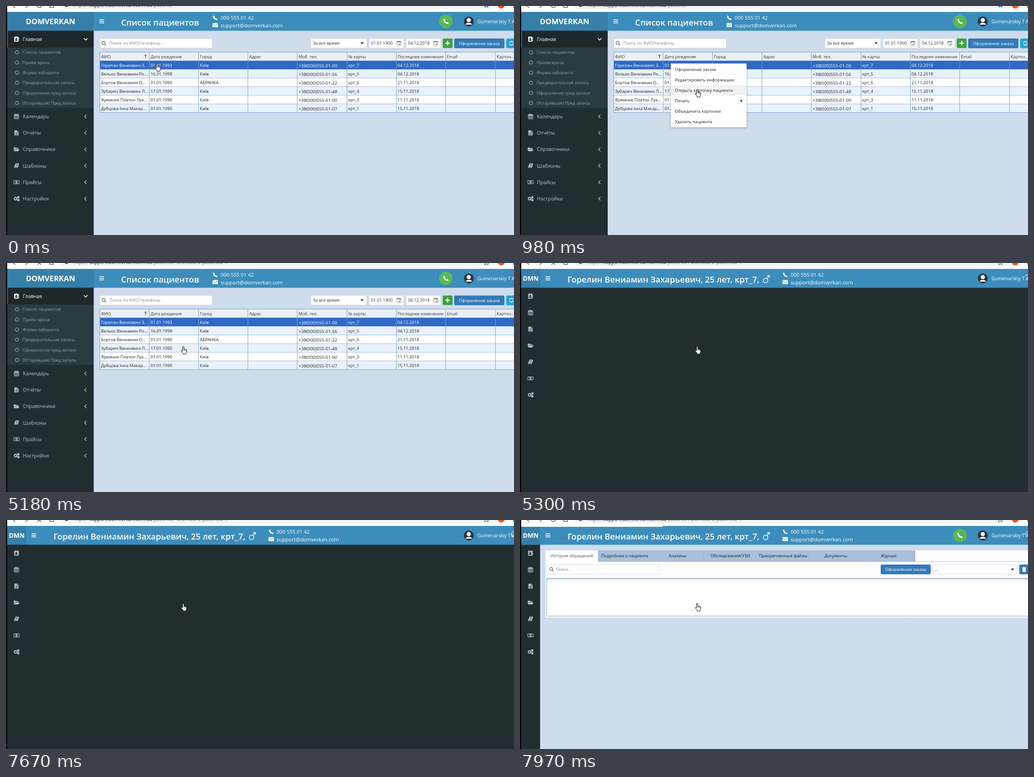
An HTML page with a canvas that plays this animation: 1112 by 504 pixels, repeating every 8 s.

```html
<!DOCTYPE html>
<html lang="ru">
<head>
<meta charset="utf-8">
<title>Список пациентов</title>
<style>
html, body { margin: 0; width: 100%; height: 100%; overflow: hidden; background: #cfdcec; }
canvas { display: block; width: 1112px; height: 504px; }
</style>
</head>
<body>
<canvas id="stage" width="1112" height="504"></canvas>
<script>
const c = document.getElementById('stage').getContext('2d');
const LOOP = 8000;
const FONT = '"Open Sans", "Noto Sans", sans-serif';
const BLUE = '#3c8dbc', DARK = '#222d32', PAGE = '#cfdcec', LINE = '#7f9dc8', BTN = '#337ab7';

const box = (x, y, w, h, fill) => { c.fillStyle = fill; c.fillRect(x, y, w, h); };

function round(x, y, w, h, r, fill, stroke) {
  c.beginPath();
  c.roundRect(x, y, w, h, r);
  if (fill) { c.fillStyle = fill; c.fill(); }
  if (stroke) { c.strokeStyle = stroke; c.lineWidth = 1; c.stroke(); }
}

function disc(x, y, r, fill) {
  c.beginPath();
  c.arc(x, y, r, 0, 7);
  c.fillStyle = fill;
  c.fill();
}

function ring(x, y, r, color, w = 1) {
  c.beginPath();
  c.arc(x, y, r, 0, 7);
  c.strokeStyle = color;
  c.lineWidth = w;
  c.stroke();
}

function line(pts, color, w = 1) {
  c.beginPath();
  for (let i = 0; i < pts.length; i += 2) c.lineTo(pts[i], pts[i + 1]);
  c.strokeStyle = color;
  c.lineWidth = w;
  c.stroke();
}

function poly(pts, fill) {
  c.beginPath();
  for (let i = 0; i < pts.length; i += 2) c.lineTo(pts[i], pts[i + 1]);
  c.closePath();
  c.fillStyle = fill;
  c.fill();
}

// y is the middle of the capital letters
function text(s, x, y, color = '#222', size = 9.25, weight = 400, align = 'left') {
  c.font = `${weight} ${size}px ${FONT}`;
  c.textAlign = align;
  c.fillStyle = color;
  c.fillText(s, x, y + size * 0.37);
  return c.measureText(s).width;
}

function at(x, y, draw) {
  c.save();
  c.translate(x, y);
  draw();
  c.restore();
}

function phone(x, y, k = 1) {
  at(x, y, () => {
    c.scale(k, k);
    c.beginPath();
    c.moveTo(-3.5, -3.5);
    c.quadraticCurveTo(-2.8, 2.8, 3.5, 3.5);
    c.strokeStyle = '#fff';
    c.lineWidth = 2.4;
    c.stroke();
    poly([-5.2, -3.6, -3.2, -5.3, -1, -2.4, -3, -0.6], '#fff');
    poly([3.6, 5.2, 5.3, 3.2, 2.4, 1, 0.6, 3], '#fff');
  });
}

function mail(x, y) {
  round(x - 6, y - 4.5, 12, 9, 1, '#fff');
  line([x - 6, y - 3, x, y + 1.2, x + 6, y - 3], BLUE);
}

function lens(x, y) {
  ring(x - 1, y - 1, 3.2, '#777', 1.4);
  line([x + 1.4, y + 1.4, x + 4.5, y + 4.5], '#777', 1.8);
}

function burger(x) {
  for (const y of [30, 33.5, 37]) box(x - 5, y - 0.5, 10, 1.6, '#fff');
}

function gear(x, y, r, color) {
  ring(x, y, r, color, 1.8);
  for (let i = 0; i < 8; i++) {
    const a = i * Math.PI / 4, u = Math.cos(a), v = Math.sin(a);
    line([x + u * r, y + v * r, x + u * (r + 1.6), y + v * (r + 1.6)], color, 1.2);
  }
}

const icons = [
  col => {
    round(-5, -5.5, 9, 11, 1, col);
    for (const y of [-3, 0, 3]) box(4, y - 0.8, 1.5, 1.6, col);
    disc(-0.5, -1.5, 1.7, DARK);
    round(-3.2, 0.6, 5.4, 2.8, 1, DARK);
  },
  col => {
    round(-5, -4, 10, 9.5, 1, null, col);
    box(-5, -4, 10, 2.3, col);
    for (const x of [-2, 1.5]) { box(x - 1, -6, 1.6, 3, col); box(x - 0.3, -2, 0.8, 7, col); }
    for (const y of [0.2, 2.6]) box(-5, y, 10, 0.8, col);
  },
  col => {
    poly([-4.5, -5.5, 1, -5.5, 1, -2, 4.5, -2, 4.5, 5.5, -4.5, 5.5], col);
    poly([2, -5.5, 4.5, -3, 2, -3], col);
    for (const y of [-0.5, 1.5, 3.5]) box(-2.5, y, 5, 0.9, DARK);
  },
  col => {
    poly([-6, 3, -6, -4, -2, -4, -1, -3, 4, -3, 4, -1, -3, -1], col);
    poly([-3, -0.2, 6.5, -0.2, 4, 4.2, -5.8, 4.2], col);
  },
  col => {
    poly([-2, -5, 5.5, -5, 3, 4.5, -5.5, 4.5, -5, 2], col);
    line([-1, -2.7, 3, -2.7], DARK, 0.9);
    line([-1.6, -0.7, 2.4, -0.7], DARK, 0.9);
    line([-4, 2.8, 2.2, 2.8], DARK, 0.9);
  },
  col => {
    box(-6.3, -4, 12.6, 8, col);
    box(-5.2, -2.9, 10.4, 5.8, DARK);
    c.beginPath();
    c.ellipse(0, 0, 2.3, 2.9, 0, 0, 7);
    c.fillStyle = col;
    c.fill();
    box(-0.5, -1.6, 1, 3.2, DARK);
  },
  col => {
    gear(-2, 0, 2.6, col);
    gear(4, -3, 1.2, col);
    gear(4, 3.2, 1.2, col);
  }
];

const sections = ['Главная', 'Календарь', 'Отчёты', 'Справочники', 'Шаблоны', 'Прайсы', 'Настройки'];
const pages = ['Список пациентов', 'Приём врача', 'Форма лаборанта', 'Предварительная запись',
  'Оформление пред.записи', '(Устаревшая) Пред запись'];

function browser(busy, opened, status) {
  box(0, 0, 1112, 13, '#fff');
  round(118, -14, 956, 21, 10, '#f1f3f4');
  const grey = '#5f6368';
  line([21, -4, 16, 0, 20, 4], grey, 1.6);
  line([43, 4, 47, 0, 42, -4], grey, 1.6);
  if (busy) {
    line([69, 4, 73, 0, 77, 4], grey, 1.6);
  } else {
    c.beginPath();
    c.arc(73, -1, 4.5, 0.2, 3);
    c.strokeStyle = grey;
    c.lineWidth = 1.6;
    c.stroke();
  }
  line([96, -2, 96, 3.2, 104, 3.2, 104, -2], grey, 1.6);
  box(129, -3, 7, 5, grey);
  let x = 146;
  x += text('https://', x, -1.5, '#777', 10.6);
  x += text('support.domverkan.com.ua', x, -1.5, '#222', 10.6);
  text('/patients' + (opened ? '/PatientCard?patientId=7' : ''), x, -1.5, '#777', 10.6);
  const star = [1047, -2, 1048, 4, 1051.5, 1.8, 1055, 4, 1056, -2];
  if (opened) line(star, grey, 1.2); else poly(star, '#4285f4');
  disc(1084, -2, 7.5, '#f4511e');
  disc(1111, 2, 1.3, grey);
  if (status) round(3, 11, 310, 4, [0, 0, 2, 0], '#fff');
}

function header(narrow, call) {
  const edge = narrow ? 44 : 192, shift = narrow ? 122.5 : 0;
  box(0, 13, 1112, 41.5, BLUE);
  box(0, 13, edge, 41.5, '#367fa9');
  if (narrow) {
    text('DMN', 23.5, 34, '#fff', 13.9, 700, 'center');
    text('Горелин Вениамин Захарьевич, 25 лет, крт_7,', 104, 36, '#fff', 18.2, 600);
    ring(537.5, 38.5, 5, '#fff', 1.4);
    line([540.5, 34.5, 545.5, 27.5], '#fff', 1.4);
    line([540.5, 28, 545.8, 27.2, 546, 32.5], '#fff', 1.4);
  } else {
    text('DOMVERKAN', 97.5, 34, '#fff', 16.6, 700, 'center');
    text('Список пациентов', 252, 36, '#fff', 18.2, 600);
  }
  burger(narrow ? 61 : 209.5);
  phone(458 + shift, 26);
  text('000 555 01 42', 470 + shift, 26, '#fff', 11.1);
  mail(458 + shift, 42);
  text('support@domverkan.com', 470 + shift, 42.5, '#fff', 11.2);
  if (call) {
    disc(963, 34, 15, '#58b957');
    phone(963, 34, 1.15);
  }
  disc(1013, 34, 10.8, '#2b3440');
  disc(1013, 31, 4.6, '#fff');
  c.beginPath();
  c.ellipse(1013, 41, 7, 4, 0, Math.PI, 0);
  c.fillStyle = '#fff';
  c.fill();
  text('Gumenarskiy T A', 1032, 34, '#fff', 10.4);
}

function spinner(t) {
  const a = Math.floor(t / 135) * 0.9;
  c.beginPath();
  c.arc(1112, 31.5, 5.8, a, a + 4.6);
  c.strokeStyle = '#fff';
  c.lineWidth = 1.2;
  c.stroke();
}

function sidebar(narrow) {
  box(0, 54.5, narrow ? 44 : 192, 450, DARK);
  if (!narrow) {
    box(0, 54.5, 192, 37, '#1e282c');
    box(2, 54.5, 2, 37, BLUE);
    box(2, 91.5, 190, 132.5, '#2c3b41');
    pages.forEach((s, i) => {
      const y = 102 + i * 22.3;
      ring(24, y, 3.7, '#8aa4af', 1.4);
      text(s, 36.5, y, '#8aa4af', 9.2);
    });
  }
  sections.forEach((s, i) => {
    const y = narrow ? 73 + i * 36.2 : i ? 243 + (i - 1) * 36.2 : 73;
    const col = i || narrow ? '#b8c7ce' : '#fff';
    at(23, y, () => icons[i](col));
    if (narrow) return;
    text(s, 37, y, col, 10.8);
    if (i) line([176, y - 4, 172, y, 176, y + 4], col, 1.4);
    else line([170.5, y - 2, 174.5, y + 2, 178.5, y - 2], col, 1.6);
  });
}

function button(x, y, w, s) {
  round(x, y, w, 21.5, 3, BTN);
  text(s, x + w / 2, y + 11, '#fff', 9.15, 400, 'center');
}

function field(x, y, w, s, col = '#333', pad = 5) {
  round(x + 0.5, y + 0.5, w - 1, 21, 2, '#fff', '#d2d9e4');
  text(s, x + pad, y + 11, col);
}

const caret = (x, y) => poly([x - 3.5, y - 2, x + 3.5, y - 2, x, y + 2], '#222');

function dateField(x, s) {
  field(x, 71, 77, s);
  round(x + 61.5, 77.5, 9, 9, 1, null, '#888');
  box(x + 61, 78, 10, 2, '#888');
  box(x + 66, 83, 2.5, 2.5, '#888');
}

const cols = [205, 313.5, 421.5, 529.5, 637.5, 746, 854, 962, 1071];
const heads = ['ФИО', 'Дата рождения', 'Город', 'Адрес', 'Моб. тел.', '№ карты', 'Последнее изменение', 'Email', 'Карточ...'];
const rows = [
  ['Горелин Вениамин З...', '01.01.1993', 'Київ', '', '+38(000)555-01-00', 'крт_7', '04.12.2018'],
  ['Велько Вениамин Ро...', '16.01.1998', 'Київ', '', '+38(000)555-01-56', 'крт_5', '04.12.2018'],
  ['Бортов Вениамин О...', '01.01.1990', 'АБРАНКА', '', '+38(000)555-01-22', 'крт_6', '21.11.2018'],
  ['Зубарич Вениамин Л...', '17.01.1990', 'Київ', '', '+38(000)555-01-48', 'крт_4', '15.11.2018'],
  ['Яремник Платон Лук...', '01.01.1990', 'Київ', '', '+38(000)555-01-90', 'крт_3', '11.11.2018'],
  ['Дубцова Інна Макар...', '01.01.1990', 'Київ', '', '+38(000)555-01-07', 'крт_1', '15.11.2018']
];

function list() {
  field(205, 71, 247, 'Поиск по ФИО/телефону...', '#888', 21);
  lens(214.5, 82);
  field(667, 71, 123, 'За всё время');
  caret(779.5, 82);
  dateField(794, '01.01.1900');
  dateField(875, '04.12.2018');
  round(956, 71.5, 21.5, 21, 3, '#409f40');
  box(961.5, 80.8, 10.5, 2.2, '#fff');
  box(965.7, 76.7, 2.2, 10.5, '#fff');
  button(981, 71.5, 110, 'Оформление заказа');
  round(1095, 71.5, 24, 21.5, 3, '#22a7d6');
  for (const a of [0.3, 3.44]) {
    c.beginPath();
    c.arc(1106, 82, 4, a, a + 2.4);
    c.strokeStyle = '#fff';
    c.lineWidth = 1.7;
    c.stroke();
  }

  box(205, 101, 907, 20, '#e9f0f8');
  rows.forEach((row, r) => {
    const y = 121 + r * 19;
    box(205, y, 907, 19, r ? (r % 2 ? '#e7f2fc' : '#fff') : '#2f69c5');
    row.forEach((s, i) => text(s, cols[i] + 3, y + 10, r ? '#222' : '#fff', i === 4 ? 9.75 : 9.25));
    line([205, y + 18.5, 1112, y + 18.5], '#a5bbdb');
  });
  heads.forEach((s, i) => {
    text(s, cols[i] + 3, 111.5, '#333', 9.2);
    const x = Math.floor(cols[i]) + 0.5;
    line([x, 101, x, 235], LINE);
  });
  line([205, 101.5, 1112, 101.5], LINE);
  line([205, 120.5, 1112, 120.5], LINE);
  line([205, 234.5, 1112, 234.5], LINE);
  line([305.5, 115, 305.5, 107], '#222');
  line([303, 109.5, 305.5, 107, 308, 109.5], '#222');
}

const actions = ['Оформление заказа', 'Редактировать информацию', 'Открыть карточку пациента',
  'Печать', 'Объединить карточки', 'Удалить пациента'];

function menu(alpha, hover) {
  c.save();
  c.globalAlpha = alpha;
  c.shadowColor = 'rgba(0,0,0,.35)';
  c.shadowBlur = 4;
  c.shadowOffsetY = 1;
  box(330, 126.5, 166, 140.5, '#fff');
  c.shadowColor = 'transparent';
  actions.forEach((s, i) => {
    const y = 139.5 + i * 23.1;
    if (i === hover) box(330, y - 11.5, 166, 23, '#f2f2f2');
    text(s, 339, y, '#222', 9.2);
    if (i === 3) poly([483, y - 3, 487, y, 483, y + 3], '#222');
  });
  c.restore();
}

const tabs = ['История обращений', 'Подробнее о пациенте', 'Анализы', 'Обследования/УЗИ',
  'Прикрепленные файлы', 'Документы', 'Журнал'];

function card() {
  box(56, 67, 1056, 147.5, '#fff');
  tabs.forEach((s, i) => {
    const x = 56 + i * 115.5;
    if (i) {
      box(x, 67, 115.5, 24, '#a9c0dc');
      const e = Math.round(x + 115) + 0.5;
      line([e, 67, e, 91], LINE);
    }
    text(s, x + 57.8, 79, i ? '#222' : '#555', 9.2, 400, 'center');
  });
  line([171, 91.5, 1112, 91.5], '#a9c0dc');
  line([171.5, 67, 171.5, 91], LINE);
  field(58, 98, 248, 'Поиск...', '#888', 21);
  lens(69, 108.5);
  button(789.5, 98, 109.5, 'Оформление заказа');
  field(903, 98, 185, '...');
  caret(1078, 109);
  round(1093, 98, 26, 21.5, 3, BTN);
  box(1100, 106, 7, 8, '#fff');
  box(1099, 104.3, 9, 1.3, '#fff');
  box(1102, 103.2, 3, 1.2, '#fff');
  box(58, 127.5, 1054, 3, '#a9c0dc');
  line([58.5, 130, 58.5, 211.5, 1112, 211.5], LINE);
}

const hand = new Path2D('M3.6 10V2Q3.6 .6 5 .6T6.4 2V6.6Q7.6 5.9 8.6 7Q9.7 6.4 10.6 7.6Q12.4 7.2 12.5 9V12Q12.4 13.8 11 15.4V17.4H4.8V15.6L.9 11Q.2 9.4 1.5 9Q2.6 8.9 3.6 10.4Z');

function cursor(x, y) {
  at(x, y, () => {
    c.fillStyle = '#fff';
    c.fill(hand);
    c.strokeStyle = '#000';
    c.lineWidth = 1;
    c.stroke(hand);
    line([6.4, 6.6, 6.4, 9.5], '#000', 0.8);
    line([8.6, 7, 8.6, 9.7], '#000', 0.8);
    line([10.6, 7.6, 10.6, 10], '#000', 0.8);
  });
}

// [start, value...] entries; the latest one that has begun applies
const pick = (keys, t) => keys.filter(k => k[0] <= t).pop();
const path = [[0, 326, 126], [150, 329, 127], [560, 356, 145], [700, 374, 162], [850, 382, 180], [980, 383, 183]];
const fade = [[0, 0], [150, 0.6], [280, 1], [1820, 0.12], [1970, 0]];

function draw(t) {
  const [, x, y] = pick(path, t);
  const narrow = t >= 5300, ready = t >= 7820;
  box(0, 0, 1112, 504, narrow && !ready ? DARK : PAGE);
  header(narrow, !narrow || ready);
  if (narrow) spinner(t);
  sidebar(narrow);
  if (!narrow) list();
  if (ready) card();
  const alpha = pick(fade, t)[1];
  if (alpha) menu(alpha, Math.floor((y - 128) / 23.1));
  browser(t >= 1820 && t < 7970, t >= 5180, ready);
  box(0, 0, 2.5, 504, '#000');
  cursor(x, y);
}

function tick(now) {
  draw(now % LOOP);
  requestAnimationFrame(tick);
}
draw(0);
requestAnimationFrame(tick);
</script>
</body>
</html>
```
